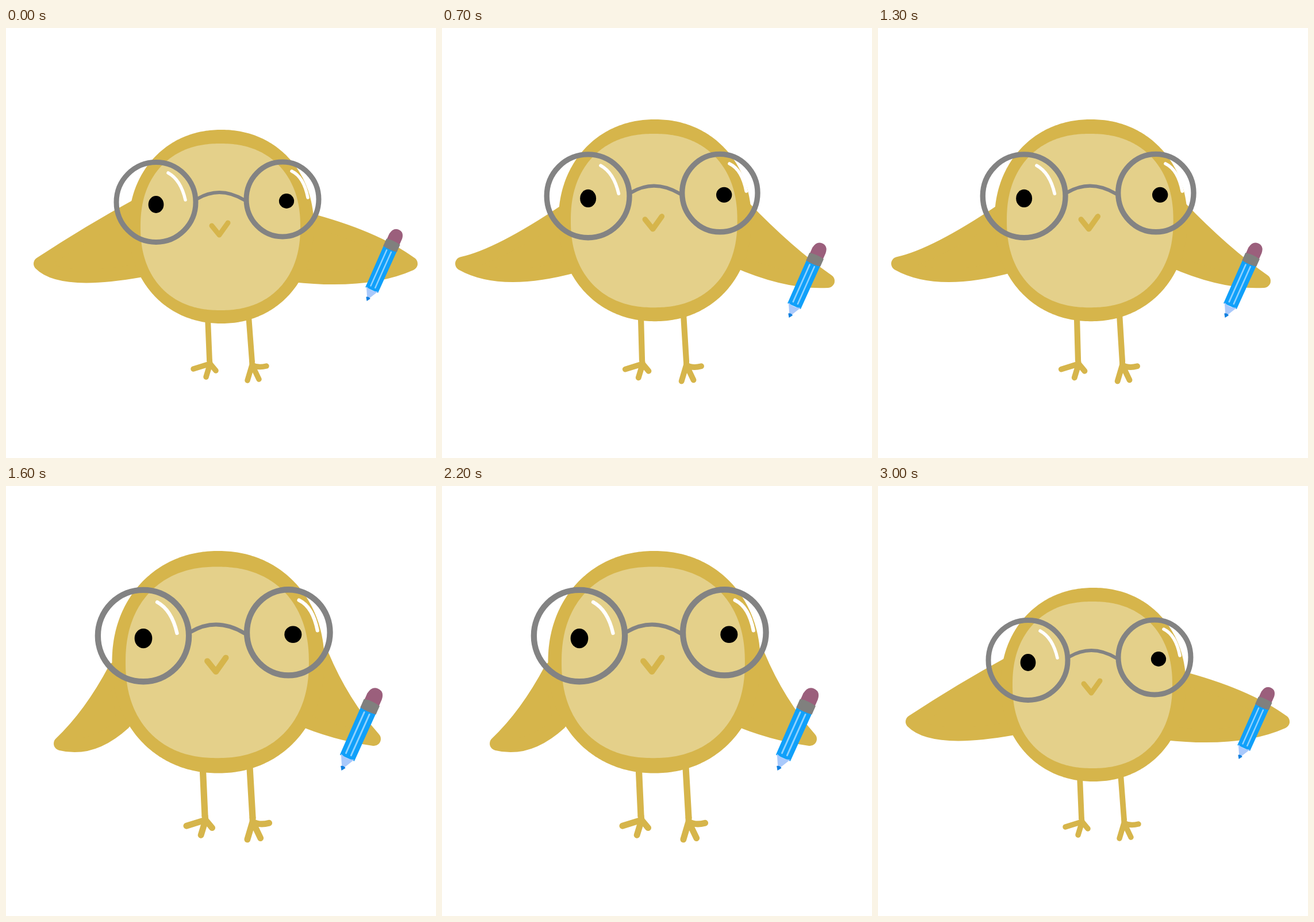
Write an HTML page with a canvas that moves like this. It is 748 px wide and 748 px high and loops after 3110 ms.

```html
<!DOCTYPE html>
<html lang="en">
<head>
<meta charset="utf-8">
<title>Bobbing bird</title>
<style>
  html, body { margin: 0; height: 100%; overflow: hidden; background: #fff; }
  canvas { display: block; }
</style>
</head>
<body>
<canvas id="stage" width="748" height="748"></canvas>
<script>
const ctx = document.getElementById('stage').getContext('2d');
const GOLD = '#d6b54b', CREAM = '#e4d08a', GREY = '#838383';
const STEP = 100, LOOP = 3110, LAST = 30;

// body: scale, left, top; glasses: shift; feet: both ankles; pencil: its tip
// wings: upper root, upper bend, tip, lower bend, lower root
const low = {
  body: [1, 234, 177], glasses: [0, 0], feet: [354, 578, 428, 580], pencil: [628, 474],
  left: [230, 308, 147, 353, 60, 410, 95, 446, 232, 422],
  right: [520, 332, 640, 363, 704, 410, 628, 444, 500, 430]
};
const rise = {
  body: [1.042, 224, 159], glasses: [2, 2], feet: [348, 578, 425, 580], pencil: [604, 503],
  left: [215, 318, 99, 396, 35, 410, 103, 448, 230, 414],
  right: [525, 312, 602, 392, 671, 440, 600, 444, 510, 404]
};
const tall = {
  body: [1.147, 208, 113], glasses: [0, 3], feet: [346, 574, 429, 577], pencil: [584, 494],
  left: [190, 318, 147, 399, 95, 448, 150, 462, 205, 412],
  right: [550, 295, 585, 378, 640, 440, 572, 431, 505, 402]
};

function blend(a, b, k) {
  const pose = {};
  for (const key in a) pose[key] = a[key].map((v, i) => v + (b[key][i] - v) * k);
  return pose;
}

const cycle = [low, rise, blend(rise, tall, .65), blend(rise, tall, 1.32), tall, blend(tall, low, .5)];

function stroke(path, color, width) {
  ctx.strokeStyle = color;
  ctx.lineWidth = width;
  ctx.stroke(new Path2D(path));
}

function fill(path, color) {
  ctx.fillStyle = color;
  ctx.fill(new Path2D(path));
}

function oval(x, y, rx, ry, color, width) {
  ctx.beginPath();
  ctx.ellipse(x, y, rx, ry, 0, 0, 2 * Math.PI);
  ctx.fillStyle = ctx.strokeStyle = color;
  ctx.lineWidth = width;
  if (width) ctx.stroke(); else ctx.fill();
}

// Superellipse: a power above 2 gives fuller corners.
function blob(x, y, rx, ry, power, color) {
  const bend = v => Math.sign(v) * Math.abs(v) ** (2 / power);
  ctx.beginPath();
  for (let a = 0; a < 2 * Math.PI; a += .02) {
    ctx.lineTo(x + rx * bend(Math.cos(a)), y + ry * bend(Math.sin(a)));
  }
  ctx.fillStyle = color;
  ctx.fill();
}

function placed(x, y, scale, draw) {
  ctx.save();
  ctx.translate(x, y);
  ctx.scale(scale, scale);
  draw();
  ctx.restore();
}

// The wide round stroke softens the wing tip.
function drawWing([x, y, ...bends]) {
  const path = `M${x} ${y}Q${bends.slice(0, 4)}Q${bends.slice(4)}Z`;
  fill(path, GOLD);
  stroke(path, GOLD, 24);
}

function drawGlasses() {
  oval(261, 307, 13.4, 15, '#000');
  oval(488, 301, 13.1, 12.9, '#000');
  stroke('M282 252Q304 264 312 299M497 249Q518 259 525 295', '#fff', 5.5);
  stroke('M333 297Q372 274 414 299', GREY, 6);
  oval(261, 303, 69, 69.5, GREY, 9);
  oval(481, 298, 63, 65, GREY, 9);
}

function drawPencil() {
  ctx.rotate(.42);
  fill('M-12 -20H12L12.5 -102H-12.5Z', '#10a0fa');
  stroke('M-4.5 -26V-94M4 -26V-94', '#8fd2ff', 2.5);
  fill('M0 -1L-11 -22Q0 -17 11 -22Z', '#a9c9fb');
  fill('M0 1L-4 -5Q0 -8 4 -5Z', '#1080e0');
  fill('M-12 -108V-122Q-10 -135 0 -135Q11 -135 12 -122V-108Z', '#9b5f7c');
  fill('M-13 -98Q0 -96 13 -98V-112Q0 -115 -13 -112Z', '#80807e');
}

function drawBird(pose) {
  const [scale, left, top] = pose.body;
  const [lx, ly, rx, ry] = pose.feet;
  const [gx, gy] = pose.glasses;
  const hip = (x, y) => `M${left + scale * (x - 234)} ${top + scale * (y - 177)}`;

  ctx.clearRect(0, 0, 748, 748);
  ctx.lineCap = ctx.lineJoin = 'round';
  stroke(`${hip(351, 505)}L${lx} ${ly}${hip(422, 500)}L${rx} ${ry}`, GOLD, 9.8 * scale);
  placed(lx, ly, scale, () => stroke('M0 0L1 6L-28 15M1 6L-6 29M1 6L11 18', GOLD, 9.5));
  placed(rx, ry, scale, () => stroke('M0 0L0 6L-8 33M0 6L12 31M0 6Q10 12 25 8', GOLD, 9.5));

  drawWing(pose.left);
  drawWing(pose.right);
  placed(left - 234 * scale, top - 177 * scale, scale, () => {
    blob(374.5, 345.5, 161, 168.5, 2.1, GOLD);
    blob(373, 346, 139, 145, 2.25, CREAM);
    stroke('M358 344L371 360L386 339', GOLD, 9);
    placed(gx / scale, gy / scale, 1, drawGlasses);
  });
  placed(...pose.pencil, scale, drawPencil);
}

function tick() {
  const step = Math.min(LAST, Math.floor(performance.now() % LOOP / STEP));
  drawBird(cycle[step % cycle.length]);
  requestAnimationFrame(tick);
}
tick();
</script>
</body>
</html>
```
